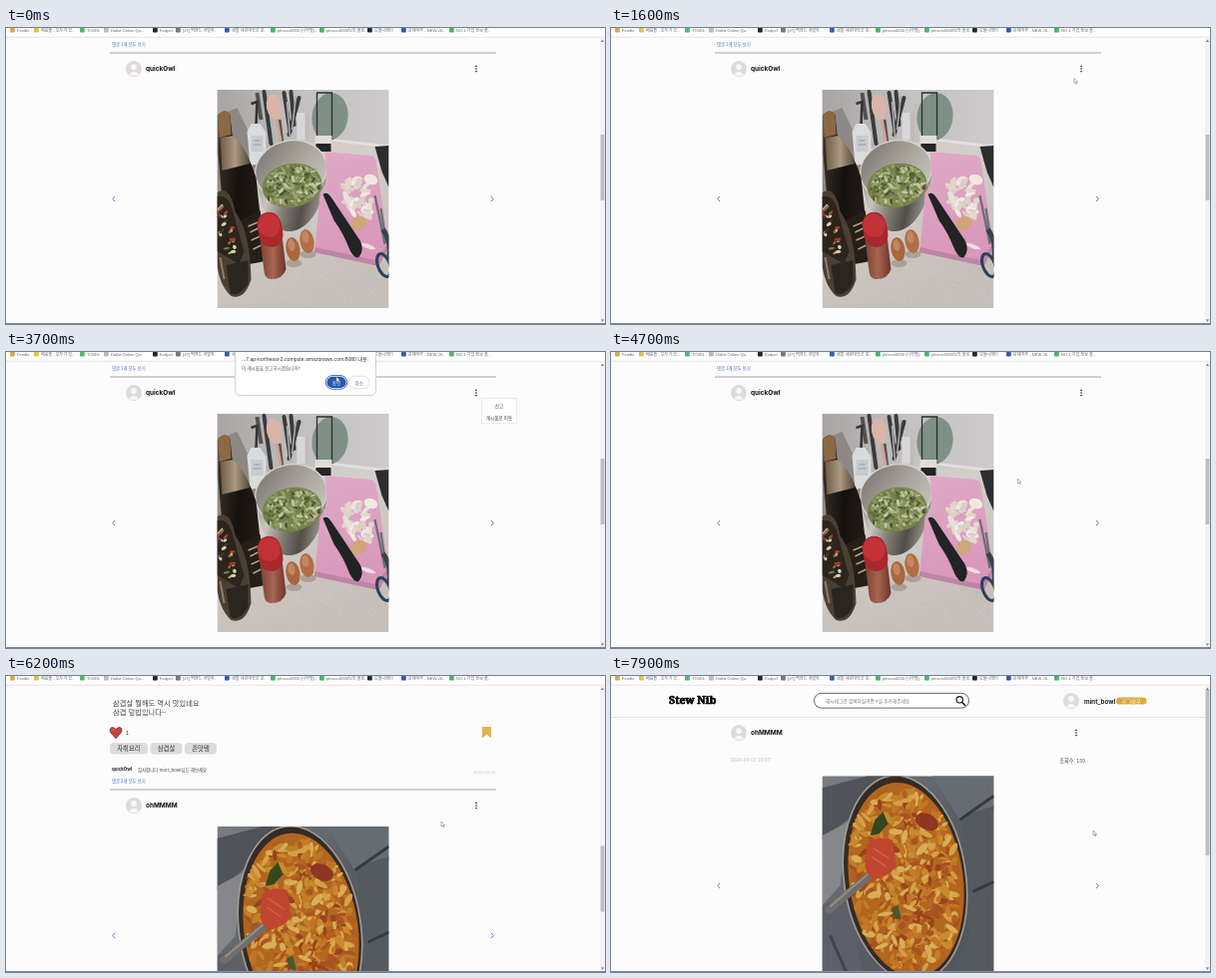
An HTML page for the animation above (8 s loop, 600 px wide and 297 px high).

```html
<!DOCTYPE html>
<html lang="ko">
<head>
<meta charset="utf-8">
<title>Recipe feed</title>
<style>
  html, body { margin: 0; width: 100%; height: 100%; overflow: hidden; background: #fdfcfd; }
  svg { display: block; width: 600px; height: 297px; }
  text { font-family: "Liberation Sans", "Noto Sans CJK KR", "Noto Sans CJK", sans-serif; white-space: pre; }
  .ko { font-family: "Noto Sans CJK KR", "Noto Sans CJK", sans-serif; }
  .name { font-family: Inter, sans-serif; font-weight: 700; }
  .logo { font-family: "Noto Serif", serif; font-weight: 900; stroke: #000; stroke-width: .7; }
</style>
</head>
<body>
<svg id="stage" viewBox="0 0 600 297"></svg>
<script>
const LOOP = 8000, STEP = 100;
const POST_PITCH = 371;
const USERS = { first: "quickOwl", second: "ohMMMM", me: "mint_bowl" };

// time, value...
const SCROLL = [
  [5200, 0], [5300, 13], [5400, 45.5], [5500, 92], [5600, 143],
  [5700, 193], [5800, 237], [5900, 268], [6000, 282]
];
const CURSOR = [
  [1200, 440, 92], [1700, 470, 40], [2000, 470, 40], [2300, 479, 52], [2900, 484, 53],
  [3500, 331, 25], [4100, 331, 25], [4800, 420, 144], [5400, 419.5, 144], [6200, 436, 146],
  [6600, 470, 128], [6900, 470, 128], [7200, 483, 155], [7900, 483, 155]
];
const SHOWN = {
  cursor: [[1200, LOOP]],
  menu: [[2100, 4200]],
  menu2: [[6800, 7500]],
  dialog: [[3100, 4200]],
  feed: [[0, 7500]],
  detail: [[7500, LOOP]]
};

function seeded(seed) {
  return () => (seed = (seed * 16807) % 2147483647) / 2147483647;
}

const rect = (x, y, w, h, fill, extra = "") =>
  `<rect x="${x}" y="${y}" width="${w}" height="${h}" fill="${fill}" ${extra}/>`;
const oval = (x, y, rx, ry, fill, turn = 0, extra = "") =>
  `<ellipse cx="${x}" cy="${y}" rx="${rx}" ry="${ry}" fill="${fill}" transform="rotate(${turn} ${x} ${y})" ${extra}/>`;
const path = (d, fill, extra = "") => `<path d="${d}" fill="${fill}" ${extra}/>`;
const line = (d, color, width, extra = "") =>
  path(d, "none", `stroke="${color}" stroke-width="${width}" ${extra}`);
const text = (x, y, size, str, fill = "#222", cls = "ko", anchor = "start") =>
  `<text x="${x}" y="${y}" font-size="${size}" fill="${fill}" class="${cls}" text-anchor="${anchor}" dominant-baseline="central">${str}</text>`;
const group = (id, body) => `<g id="${id}">${body}</g>`;
const gradient = (id, x2, y2, ...colors) =>
  `<linearGradient id="${id}" x2="${x2}" y2="${y2}">${colors.map((c, i) =>
    `<stop offset="${i / (colors.length - 1)}" stop-color="${c}"/>`).join("")}</linearGradient>`;

// Small pieces of food strewn over a tilted ellipse
function strew(seed, count, [cx, cy, rx, ry, tilt = 0], size, colors) {
  const rnd = seeded(seed);
  let out = "";
  for (let i = 0; i < count; i++) {
    const a = rnd() * Math.PI * 2, r = Math.sqrt(rnd());
    const color = colors[Math.floor(rnd() * colors.length)];
    out += oval((cx + rx * r * Math.cos(a)).toFixed(1), (cy + ry * r * Math.sin(a)).toFixed(1),
      (size * (.7 + rnd())).toFixed(1), (size * (.35 + rnd() * .4)).toFixed(1), color, Math.floor(rnd() * 180));
  }
  return `<g transform="rotate(${tilt} ${cx} ${cy})">${out}</g>`;
}

const paints = `<defs>${
  gradient("wall", 1, 0, "#a8a4a3", "#c2c0c0", "#cdcbcb")
  + gradient("table", .3, 1, "#cbc6c2", "#d3ceca", "#c6bfb9")
  + gradient("steel", 1, .2, "#8d8982", "#c9c5be", "#827d75", "#514d47", "#99958d")
  + gradient("inside", 1, 1, "#74706a", "#a8a49c", "#cfccc6")
  + gradient("plastic", .2, 1, "#e0a9c6", "#d897bb")
  + gradient("soy", 1, .2, "#3c3129", "#14110f", "#241c16")
  + gradient("glass", 1, 0, "#6e5b45", "#aa9a82", "#544636")
  + gradient("spice", 1, 0, "#7b4032", "#a76552", "#6d3328")
  + gradient("stove", 1, 1, "#7b7e83", "#585d63", "#4d5359")
}</defs>`;

function counterPhoto() {
  const round = 'stroke-linecap="round"';
  return rect(0, 0, 172, 219, "url(#table)")
    + path("M0 0H172V56L100 52L0 66Z", "url(#wall)")
    + path("M0 26L20 18L40 60V120H0Z", "#8d8885")
    + line("M112 50L172 57", "#e2dfdd", 3)
    + path("M158 57L172 56V98L165 82Z", "#2b2e31")
    // rack and utensils
    + oval(113, 27, 18, 24, "#7f9187", 8)
    + line("M100 57V3H115V50", "#2b2c2d", 1.3)
    + rect(98, 46, 17, 9, "#dfdcd9") + rect(99, 54, 15, 8, "#242526")
    + line("M47 2L54 54M67 3L73 42M74 2L77 35M82 8L72 45", "#3a3b3d", 4, round)
    + line("M40 3L44 30M62 30L65 55", "#55514f", 4)
    + line("M70 12L73 48M79 6L75 40", "#a9a9ab", 1.6)
    + line("M59 25L64 54", "#cda39a", 3)
    + oval(57, 17, 7.5, 13, "#dab4a9", -10)
    + path("M80 23H93V50H80Z", "#d8d6d6")
    + path("M88 23H93V50H88Z", "#bdbbbc")
    // soap
    + line("M34 14L40 12L39 35", "#343638", 2.6)
    + path("M34 34H43L49 43V73L33 76L30 42Z", "#d9dbdc")
    + rect(34, 46, 12, 16, "#c6cbcd")
    + line("M37 51H43M36 55H44", "#8b9194", .8)
    // bowl
    + path("M39 76C40 112 52 143 74 142C97 139 112 105 110 69Z", "url(#steel)")
    + oval(74, 81, 36, 30, "url(#inside)", -13, 'stroke="#d6d3cd" stroke-width="1.3"')
    + oval(75, 96, 30, 22, "#77824d", -10)
    + strew(31, 190, [75, 96, 28, 20, -10], 2.2, ["#a9b283", "#c3c6a6", "#5f6e38", "#87955a", "#4a5632", "#9aa070"])
    // board
    + path("M108 62L154 66Q158 67 159 71L172 158L163 174Q161 177 156 175L98 161L103 104L110 92Z", "url(#plastic)")
    + path("M98 158L159 171L171 155V160L162 177L97 163Z", "#bd85a6")
    + strew(9, 44, [141, 108, 13, 23, -18], 4.2, ["#e9e0d9", "#dccfc6", "#f1eae3", "#e4d6cb"])
    + oval(154, 90, 7, 5, "#f0e9e1", 20) + oval(142, 134, 8, 7, "#cfa678", -25)
    + oval(151, 157, 8, 2, "#ecdde0", 20)
    // knife and scissors
    + path("M105 93L112 104L123 127L116 126Z", "#bdbbba")
    + path("M106 105Q110 101 115 109L143 151Q148 160 142 168Q138 170 133 161Q126 143 117 131Z", "#222325")
    + line("M158 106L168 155M164 119L169 153", "#6b6f76", 2.2)
    + line("M166 140Q175 152 172 170", "#3a414e", 5)
    + oval(167, 176, 6, 12, "none", -20, 'stroke="#2d4059" stroke-width="3"')
    // soy bottle
    + path("M1 25Q8 18 13 25L15 45Q31 62 39 88L48 172L26 176L5 110L1 65Z", "url(#soy)")
    + path("M1 25Q8 18 13 25L14 45L2 48Z", "#8d6844")
    + path("M3 48L16 46Q29 58 33 74L5 81Z", "url(#glass)")
    + path("M22 132L43 121L50 165L28 176Z", "#251f1a")
    + line("M31 137L43 132M33 143L43 138M34 151L45 146M36 160L44 156", "#b5a27f", 1.5)
    // front bottle
    + path("M0 103Q13 95 18 122Q33 142 34 190Q28 211 14 207Q3 197 0 177Z", "#4b3f33")
    + path("M0 107Q9 105 14 116L27 162L22 175L0 162Z", "#2c251d")
    + strew(14, 26, [9, 140, 7, 26, -15], 2.4, ["#c7ab55", "#d8cdb8", "#a8392f", "#463424", "#8b7440"])
    + path("M9 176L31 171L31 194Q22 209 13 204Z", "#2b2520")
    + line("M3 168L7 190", "#8a7d6b", 2)
    // spice jar and eggs
    + path("M43 150L65 146L69 180Q66 190 54 190Q48 190 47 182Z", "url(#spice)")
    + path("M40 134Q43 121 55 123Q65 126 66 146Q66 156 55 158Q45 158 42 147Z", "#a8282c")
    + oval(52, 136, 11, 12, "#c23237", -15)
    + oval(77, 174, 8, 4, "#aaa098") + oval(91, 165, 8, 4, "#aaa098")
    + oval(76, 160, 7, 12, "#a9663f", -10) + oval(90, 152, 7, 12, "#b06e46", -10)
    + oval(74.5, 156, 3.5, 6, "#c28762", -10) + oval(88.5, 148, 3.5, 6, "#c28762", -10)
    + strew(5, 80, [104, 199, 66, 18], .5, ["#b5ada6", "#dfd9d4"]);
}

function panPhoto() {
  return rect(0, 0, 172, 219, "url(#stove)")
    + path("M0 12L45 0H80L28 42L0 64Z", "#50545a")
    + path("M0 60L26 46L18 110L0 130Z", "#85878b")
    + path("M110 0H172V34L138 44Z", "#656d73")
    + path("M140 40L172 30V219H120L148 160Z", "#545a60")
    + line("M138 44L172 20M151 116L172 106", "#363b41", 3)
    + path("M0 130L22 120L46 219H0Z", "#5d6068")
    + line("M8 160L34 219", "#41454b", 3)
    + oval(83, 103, 61, 104, "#352b25", -8, 'stroke="#a19c95" stroke-width="1.6"')
    + oval(84, 104, 57, 98, "#b2661f", -8)
    + strew(77, 520, [84, 104, 53, 93, -8], 4.6, ["#c98a2f", "#d6a046", "#b0601f", "#c27526", "#98431d", "#d8ad58", "#bf8029", "#a85322"])
    + oval(105, 46, 12, 8, "#8f3524", 25)
    + path("M53 44L61 36L66 48L57 58L48 60Z", "#34471f")
    + path("M70 132L76 130L79 144L72 143Z", "#45592a")
    + line("M52 96L7 134", "#716d6a", 8, 'stroke-linecap="round"')
    + line("M50 95L8 131", "#918d89", 2)
    + path("M45 69Q54 59 70 64L74 89Q70 100 52 104Q43 99 43 87Z", "#c04630")
    + line("M51 72L67 83M50 81L64 91", "#cf5f43", 1.5);
}

const avatar = (x, y) => oval(x, y, 8, 8, "#dedcda")
  + oval(x, y - 2, 2.8, 3, "#f8f7f6") + path(`M${x - 5} ${y + 6}Q${x} ${y - 1} ${x + 5} ${y + 6}Q${x} ${y + 8} ${x - 5} ${y + 6}`, "#f8f7f6");
const dots = (x, y) => [-2.6, 0, 2.6].map(d => oval(x, y + d, .8, .8, "#222")).join("");
const arrows = y => line(`M109.1 ${y - 2.6}L106.8 ${y}L109.1 ${y + 2.6}M486 ${y - 2.6}L488.3 ${y}L486 ${y + 2.6}`, "#4a84c8", 1);
const userRow = (y, name, dotX) => avatar(128, y) + text(140, y, 6.4, name, "#111", "name") + dots(dotX, y);
const photo = (y, body) => `<svg x="211.5" y="${y}" width="172" height="219" viewBox="0 0 172 219">${body}</svg>`;
const link = (y, n) => text(106, y, 4.3, `댓글 ${n}개 모두 보기`, "#4a72b0");
const divider = y => rect(104, y - .5, 387, 1, "#a4a3a5");
const tag = (x, w, label) => rect(x, 349, w, 11.5, "#dddcdc", 'rx="4"') + text(x + w / 2, 354.6, 6.4, label, "#333", "ko", "middle");

function menu(id, y) {
  return group(id, rect(476.5, y, 35, 25, "#fff", 'stroke="#dedde0" stroke-width=".6"')
    + text(494, y + 7, 4.5, "신고", "#333", "ko", "middle")
    + text(494, y + 19, 4.5, "게시물로 이동", "#333", "ko", "middle"));
}

function feed() {
  const y2 = POST_PITCH;
  return link(15.5, 1) + divider(25)
    + userRow(41, USERS.first, 471) + photo(62, counterPhoto()) + arrows(171.5)
    + text(107, 309, 7.3, "삼겹살 뭘해도 역시 맛있네요", "#444")
    + text(107, 318, 7.3, "삼겹 덮밥입니다~", "#444")
    + path("M110 344.7L104.6 338.5Q103.2 334.5 106.2 333.6Q108.8 333.2 110 336Q111.3 333.2 114 333.6Q117 334.5 115.5 338.5Z", "#c8443c", 'stroke="#653330" stroke-width=".8"')
    + line("M106.7 336.2L108.4 335.5", "#e59a8f", 1)
    + text(120, 338.8, 5.5, "1", "#333", "")
    + path("M477 333H486V344.5L481.5 340.5L477 344.5Z", "#e2b35b")
    + tag(104, 38, "자취요리") + tag(144.5, 32, "삼겹살") + tag(179, 32, "존맛탱")
    + text(106, 375.5, 4.4, USERS.first, "#222", "name")
    + text(132, 375.5, 4.4, `감사합니다 ${USERS.me}님도 해보세요`, "#444")
    + text(490.5, 378.3, 4.4, "2024-04-03", "#c5c4c6", "", "end")
    + link(386.5, 2) + divider(25 + y2)
    + userRow(41 + y2, USERS.second, 471) + photo(62 + y2, panPhoto()) + arrows(171.5 + y2)
    + menu("menu", 46.5) + menu("menu2", 46.5 + y2);
}

function detail() {
  return text(58, 24, 10.6, "Stew Nib", "#000", "logo")
    + rect(203.5, 17.3, 155, 14.8, "#fff", 'rx="7.4" stroke="#555" stroke-width=".9"')
    + text(215, 24.5, 4.7, "해시태그로 검색하실려면 #을 추가해주세요", "#777")
    + oval(349.2, 23.8, 3.2, 3.2, "none", 0, 'stroke="#111" stroke-width="1.1"')
    + line("M351.5 26.2L355 29.7", "#111", 1.5)
    + avatar(461, 25) + text(474, 25, 6.2, USERS.me, "#222", "name")
    + rect(506, 21.5, 30.5, 7, "#dfa83f", 'rx="3.5"') + text(521.2, 25, 5.2, "로그아웃", "#fff", "ko", "middle")
    + rect(0, 41, 595, .8, "#dddce0")
    + userRow(57, USERS.second, 466)
    + text(120, 83.5, 5, "2024-04-03 19:07", "#bcbbbd", "")
    + text(475, 84.5, 5.2, "조회수: 159", "#444", "ko", "end")
    + photo(100.3, panPhoto()) + arrows(210.5);
}

function bookmarks() {
  const items = [
    [4, "#d8a84c", "Fendle"], [28, "#e0c23f", "배움뜰 - 모두가 있.."], [74, "#4fbd63", "TOVEL"],
    [98, "#b9bac0", "Dalbit Online Qu.."], [147, "#22252a", "Kodpel"], [170, "#77797d", "[#7] 백엔드 개발자.."],
    [219, "#3260b5", "샘물 새온대학교 포.."], [265, "#45b868", "plmvex0000 (나무별).."],
    [314, "#45b868", "plmvex0000님의 블로.."], [362, "#23283b", "모듈나래터"],
    [396, "#3457bb", "문제마루 - NEW JS.."], [444, "#50b365", "NO.1 기업 정보 플.."]
  ];
  return rect(0, 0, 600, 9, "#fff") + rect(0, 8.7, 600, .8, "#dddbe4")
    + items.map(([x, color, label]) =>
      rect(x, -.2, 4.8, 4.8, color, 'rx="1"') + text(x + 7, 2.1, 4.1, label, "#66676b", "")).join("");
}

function dialog() {
  return rect(229.5, -8, 141, 51.5, "#fff", 'rx="5" stroke="#d2d0d7" stroke-width="1"')
    + text(236, 7, 5.1, "...7.ap-northeast-2.compute.amazonaws.com:8080 내용:", "#333", "")
    + text(236, 16, 4.5, "이 게시물을 신고하시겠습니까?", "#555")
    + rect(320.2, 23.6, 21.6, 13.6, "#fff", 'rx="6.8" stroke="#2d56a8" stroke-width=".9"')
    + rect(321.4, 24.8, 19.2, 11.2, "#2855ab", 'rx="5.6"')
    + text(331, 30.5, 4.5, "확인", "#fff", "ko", "middle")
    + rect(343.5, 24.2, 20.5, 12.4, "#fff", 'rx="6.2" stroke="#cfd4e3" stroke-width=".7"')
    + text(353.7, 30.5, 4.5, "취소", "#4a68a5", "ko", "middle");
}

const scrollbar = rect(595, 9.5, 5, 287.5, "#f2f1f3")
  + path("M596 14L597.5 11.8L599 14Z", "#77767a") + path("M596 292.5L597.5 294.7L599 292.5Z", "#77767a")
  + `<rect id="thumb" x="595.6" width="3.8" fill="#bfbec1"/>`;

const stage = document.getElementById("stage");
stage.innerHTML = paints + rect(0, 0, 600, 297, "#fdfcfd")
  + group("feed", feed()) + group("detail", detail())
  + bookmarks() + scrollbar + group("dialog", dialog())
  + rect(0, 296, 600, 1, "#858699")
  + group("cursor", path("M0 0V5L1.2 3.9L2.1 5.9L3 5.5L2.1 3.6H3.6Z", "#fff", 'stroke="#777" stroke-width=".55"'));

const el = id => document.getElementById(id);
const move = (id, x, y) => el(id).setAttribute("transform", `translate(${x} ${y})`);

function sample(table, t) {
  if (t <= table[0][0]) return table[0].slice(1);
  const i = table.findIndex(row => row[0] >= t);
  if (i < 0) return table[table.length - 1].slice(1);
  const a = table[i - 1], b = table[i];
  const k = (t - a[0]) / (b[0] - a[0]);
  return a.slice(1).map((v, n) => v + (b[n + 1] - v) * k);
}

function draw(now) {
  const t = Math.floor((now % LOOP) / STEP) * STEP;
  for (const id in SHOWN) {
    const on = SHOWN[id].some(([from, to]) => t >= from && t < to);
    el(id).setAttribute("display", on ? "inline" : "none");
  }
  const [scroll] = sample(SCROLL, t);
  const inDetail = t >= SHOWN.detail[0][0];
  move("feed", 0, -scroll);
  move("cursor", ...sample(CURSOR, t));
  el("thumb").setAttribute("y", inDetail ? 14 : 107 + scroll * .225);
  el("thumb").setAttribute("height", inDetail ? 166 : 66);
}

function tick() {
  draw(performance.now());
  requestAnimationFrame(tick);
}
tick();
</script>
</body>
</html>
```
